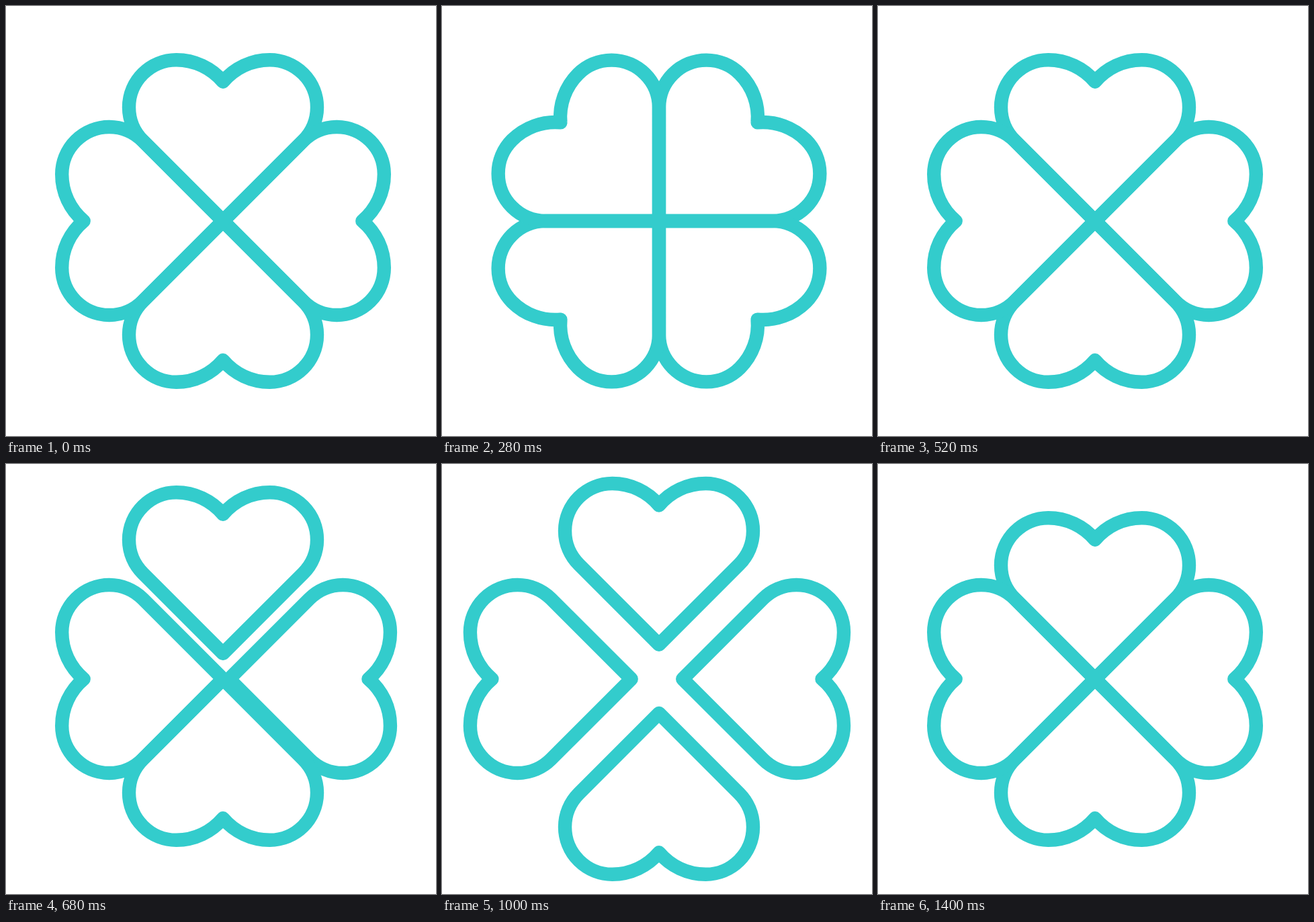
Write an HTML page with a canvas that moves like this. It is 640 px wide and 640 px high and loops after 1.48 s.

```html
<!DOCTYPE html>
<html lang="en">
<head>
<meta charset="utf-8">
<title>Clover</title>
<style>
  html, body { margin: 0; width: 100%; height: 100%; overflow: hidden; background: #fff; }
  canvas { display: block; width: 640px; height: 640px; }
</style>
</head>
<body>
<canvas id="stage" width="640" height="640"></canvas>
<script>
const ctx = document.getElementById('stage').getContext('2d');
const LOOP = 1480, STEP = 40;
const CENTER = { x: 323, y: 320 };
const CLOSE_START = 1240, CLOSE_END = 1400;

const linear = t => t;

// Cubic bezier ease (a, 0, 1 - a, 1), solved by bisection.
const easeInOut = a => t => {
  let lo = 0, hi = 1;
  for (let i = 0; i < 30; i++) {
    const u = (lo + hi) / 2, v = 1 - u;
    const x = 3 * v * v * u * a + 3 * v * u * u * (1 - a) + u * u * u;
    if (x < t) lo = u; else hi = u;
  }
  return lo * lo * (3 - 2 * lo);
};
const smooth = easeInOut(1 / 3);
const brisk = easeInOut(1 / 6);

// Clockwise from the top; each leaf opens 80 ms after the one before.
const leaves = [
  { reach: 51.2, close: linear },
  { reach: 35.2, close: brisk },
  { reach: 51, close: brisk },
  { reach: 41.3, close: brisk }
];

const progress = (time, start, end, ease) =>
  ease(Math.min(1, Math.max(0, (time - start) / (end - start))));

// Heart pointing at the origin, lobes upward.
function makeHeart() {
  const path = new Path2D();
  const up = -Math.PI / 2, side = Math.PI * 0.75, bend = 50.1 * Math.PI / 180;
  const lobeX = 69.5, lobeY = -169.3, lobeR = 70.5;
  const dipR = 90.6, dipY = lobeY - lobeR + dipR;
  path.moveTo(0, 0);
  path.arc(-lobeX, lobeY, lobeR, up - side, up);
  path.arc(-lobeX, dipY, dipR, up, up + bend);
  path.arc(lobeX, dipY, dipR, up - bend, up);
  path.arc(lobeX, lobeY, lobeR, up, up + side);
  path.closePath();
  return path;
}
const heart = makeHeart();

function draw(time) {
  const spin = Math.PI / 2 * progress(time, 40, 520, smooth);
  ctx.setTransform(1, 0, 0, 1, 0, 0);
  ctx.fillStyle = '#fff';
  ctx.fillRect(0, 0, 640, 640);
  ctx.strokeStyle = '#33cccc';
  ctx.lineWidth = 20.4;
  ctx.lineJoin = 'round';
  leaves.forEach(({ reach, close }, i) => {
    const start = 520 + 80 * i;
    const open = progress(time, start, start + 240, smooth)
      * (1 - progress(time, CLOSE_START, CLOSE_END, close));
    ctx.setTransform(1, 0, 0, 1, CENTER.x, CENTER.y);
    // A finished quarter turn looks the same as none.
    ctx.rotate(i * Math.PI / 2 + (time < 520 ? spin : 0));
    ctx.translate(0, -reach * open);
    ctx.stroke(heart);
  });
}

function tick() {
  const time = performance.now() % LOOP;
  draw(Math.floor(time / STEP) * STEP);
  requestAnimationFrame(tick);
}
tick();
</script>
</body>
</html>
```
